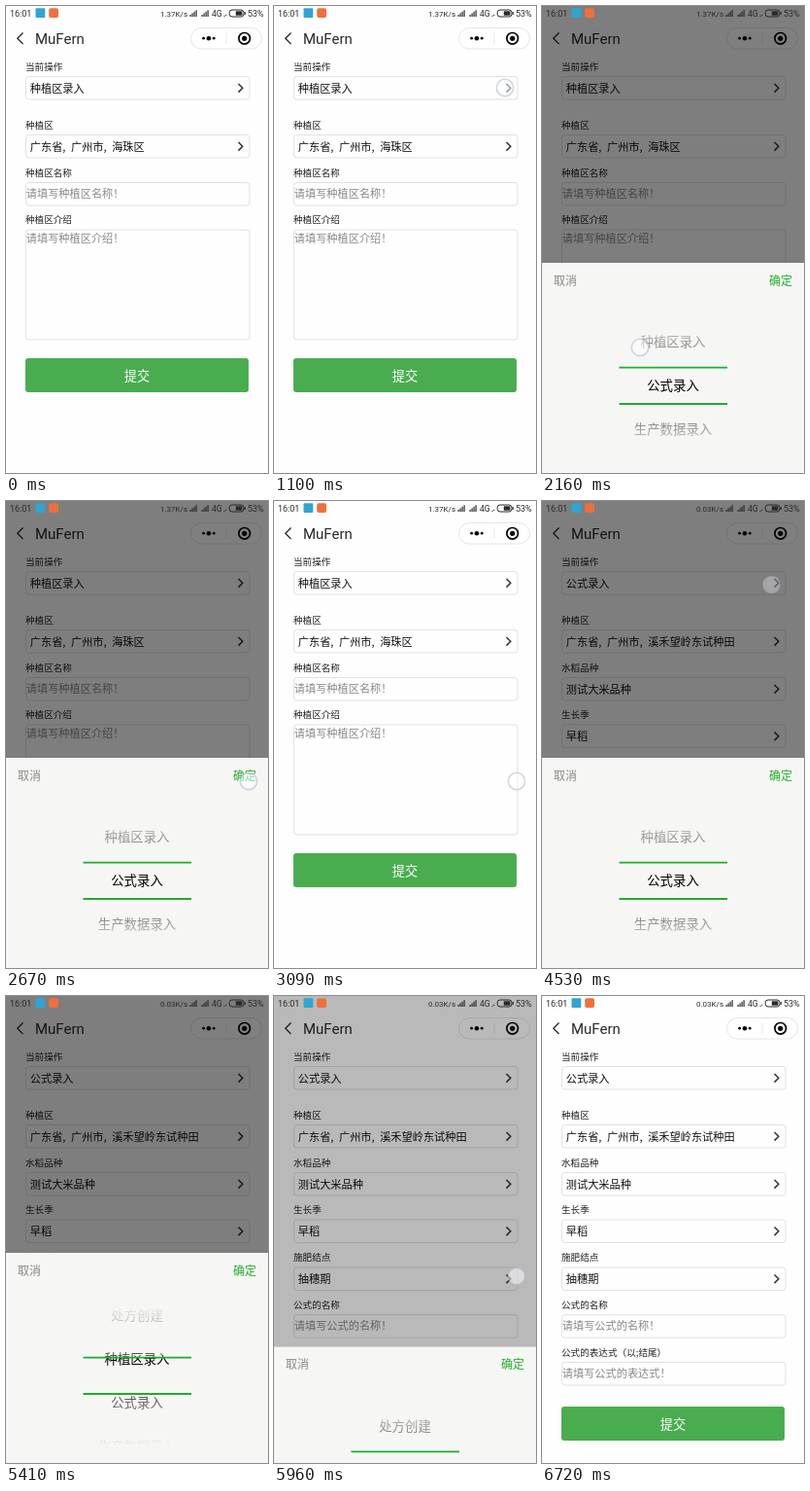
An HTML page that plays this animation: 270 by 480 pixels, repeating every 8000 ms.

```html
<!DOCTYPE html>
<html lang="zh-CN">
<head>
<meta charset="utf-8">
<style>
  html, body { margin: 0; height: 100%; overflow: hidden; background: #fefefe; }
  svg { display: block; width: 100vw; height: 100vh; }
  text { font-family: "Noto Sans CJK SC", "Noto Sans CJK", "Noto Sans SC", sans-serif; white-space: pre; }
  .latin { font-family: Roboto, "Noto Sans", sans-serif; }
  .value { word-spacing: 3px; }
</style>
</head>
<body>
<svg id="stage" viewBox="0 0 270 480"></svg>
<script>
const LOOP = 8000, GREEN = '#1fad2b', INK = '#2a2a2a', ROW = 45;
const ITEMS = ['处方创建', '种植区录入', '公式录入', '生产数据录入'];

// y is the middle of the line
const text = (x, y, size, str, attrs = '') =>
  `<text x="${x}" y="${y + size * .38}" font-size="${size}" ${attrs}>${str}</text>`;
const latin = (x, base, size, str, attrs = '') =>
  `<text class="latin" x="${x}" y="${base}" font-size="${size}" fill="${INK}" ${attrs}>${str}</text>`;
const rect = (x, y, w, h, attrs) => `<rect x="${x}" y="${y}" width="${w}" height="${h}" ${attrs}/>`;
const circle = (x, y, r, attrs = '') => `<circle cx="${x}" cy="${y}" r="${r}" ${attrs}/>`;
const line = (d, color, width) => `<path d="${d}" fill="none" stroke="${color}" stroke-width="${width}"/>`;
const ink = (x, y, w, h) => rect(x, y, w, h, `fill="${INK}"`);

const label = (y, str) => text(20, y, 9.6, str, 'fill="#222"');
const box = (y, h) => rect(20.5, y + .5, 230.5, h, 'rx="3" fill="none" stroke="#e1e1e1"');
const select = (y, name, value) => label(y, name) + box(y + 10, 23.5) +
  text(24.8, y + 22.3, 11.2, value, 'class="value" fill="#111"') +
  line(`M239.5 ${y + 18}l4.3 4.3l-4.3 4.3`, '#333', 1.5);
const input = (y, name, hint, h = 23.5) => label(y, name) + box(y + 10, h) +
  text(20.8, y + (h > 30 ? 19 : 22), 11.2, hint, 'fill="#888"');
const submit = y => rect(20, y, 230, 35, 'rx="3" fill="#49ad50"') +
  text(135, y + 17.5, 13.2, '提交', 'fill="#fff" text-anchor="middle"');

const header = line('M17.5 27.5l-5.7 5.8l5.7 5.8', '#222', 1.3) +
  latin(30, 39, 15, 'MuFern') +
  rect(190.5, 22.5, 73, 21.5, 'rx="10.75" fill="#fff" stroke="#e6e6e6"') +
  line('M227 27.5v11.5', '#e2e2e2', .8) +
  circle(203.6, 33.2, 1.4) + circle(208.9, 33.2, 2.3) + circle(214.2, 33.2, 1.4) +
  circle(245.7, 33.3, 5.8, 'fill="none" stroke="#000" stroke-width="1.7"') + circle(245.7, 33.3, 2.6);

const bars = x => [0, 1, 2, 3].map(i => ink(x + i * 2, 9 - i * 1.6, 1.2, 2 + i * 1.6)).join('');
const status = latin(4, 11, 9, '16:01') + latin(159, 10.8, 8, '', 'id="speed"') +
  bars(189.5) + bars(201.5) + latin(212, 10.8, 8.6, '4G') +
  ink(224.6, 9.8, 1, 1.2) + ink(226.3, 8.8, 1, 1.2) +
  rect(230.2, 4, 14.8, 7, `rx="2.8" fill="none" stroke="${INK}"`) +
  ink(236.8, 5.3, 6.6, 4.4) + ink(245.6, 6, 1.2, 3) + latin(249, 11, 9, '53%');
const badges = rect(30.5, 2.3, 9.8, 9.8, 'rx="1" fill="#2fa5d4"') +
  rect(44.2, 2.3, 9.8, 9.8, 'rx="2" fill="#f0703a"');

const areaForm = select(62, '当前操作', '种植区录入') +
  select(122, '种植区', '广东省, 广州市, 海珠区') +
  input(171, '种植区名称', '请填写种植区名称！') +
  input(219.5, '种植区介绍', '请填写种植区介绍！', 113) + submit(362);

const formulaForm = select(62, '当前操作', '公式录入') +
  select(122, '种植区', '广东省, 广州市, 溪禾望岭东试种田') +
  select(171, '水稻品种', '测试大米品种') + select(219.5, '生长季', '早稻') +
  select(268.5, '施肥结点', '抽穗期') +
  input(317.2, '公式的名称', '请填写公式的名称！') +
  input(366, '公式的表达式（以;结尾）', '请填写公式的表达式！') + submit(422);

// the picker is clear between its lines and fades out above and below
const stops = [[0, 0], [.37, .72], [.37, 1], [.63, 1], [.63, .72], [1, 0]];
const fade = `<linearGradient id="fade" gradientUnits="userSpaceOnUse" x1="0" x2="0" y1="318" y2="462">
  ${stops.map(([o, a]) => `<stop offset="${o}" stop-color="#fff" stop-opacity="${a}"/>`).join('')}
  </linearGradient><mask id="window" maskUnits="userSpaceOnUse" x="0" y="264" width="270" height="216">
  ${rect(0, 318, 270, 144, 'fill="url(#fade)"')}</mask>`;
const sheet = rect(0, 264, 270, 216, 'fill="#f6f6f5"') +
  text(12, 282, 12, '取消', 'fill="#888"') + text(234, 282, 12, '确定', `fill="${GREEN}"`) +
  `<g mask="url(#window)"><g id="list">${ITEMS.map((s, i) =>
    text(135, 390 + i * ROW, 13.4, s, 'text-anchor="middle"')).join('')}</g></g>` +
  line('M79.5 371.7h111.5M79.5 409h111.5', GREEN, 1.8);

const $ = id => document.getElementById(id);
$('stage').innerHTML = `${fade}<rect width="270" height="480" fill="#fefefe"/>${header}
  <g id="area">${areaForm}</g><g id="formula">${formulaForm}</g>
  <rect id="dim" width="270" height="480"/>${status}${badges}<g id="sheet">${sheet}</g>
  <circle id="touch" r="8.7" fill="#fff" fill-opacity=".5" stroke="#a9b2cc" stroke-opacity=".55" stroke-width="1.5"/>`;

const clamp = v => Math.min(1, Math.max(0, v));
const ramp = (t, a, b) => clamp((t - a) / (b - a));
const easeOut = p => 1 - (1 - p) ** 3;
const smooth = p => p * p * (3 - 2 * p);

const openness = t =>
  easeOut(ramp(t, 1160, 1500)) - easeOut(ramp(t, 2680, 3020)) +
  easeOut(ramp(t, 4360, 4530)) - easeOut(ramp(t, 5900, 6240));

// index of the centred row
const row = t => 1 + smooth(ramp(t, 1800, 2130)) - smooth(ramp(t, 5060, 5660));

// from, to, x, y, and y travel per row
const TOUCHES = [
  [980, 1240, 238, 84, 0],
  [1760, 2300, 101, 441, -ROW],
  [2600, 3230, 250, 288, 0],
  [4360, 4580, 236.5, 86, 0],
  [5030, 5320, 101, 450, -ROW],
  [5850, 6400, 250, 288, 0]
];

function draw(t) {
  const open = openness(t), r = row(t), formula = t >= 3200;
  $('area').style.display = formula ? 'none' : '';
  $('formula').style.display = formula ? '' : 'none';
  $('speed').textContent = t < 4100 ? '1.37K/s' : '0.03K/s';
  $('dim').setAttribute('opacity', .5 * open);
  $('sheet').setAttribute('transform', `translate(0 ${216 * (1 - open)})`);
  $('list').setAttribute('transform', `translate(0 ${-r * ROW})`);
  const hit = TOUCHES.find(([a, b]) => t >= a && t < b);
  $('touch').setAttribute('opacity', hit ? ramp(t, hit[0], hit[0] + 60) * ramp(t, hit[1], hit[1] - 80) : 0);
  if (hit) {
    $('touch').setAttribute('cx', hit[2]);
    $('touch').setAttribute('cy', hit[3] + hit[4] * r);
  }
}

const start = performance.now();
function frame() {
  draw((performance.now() - start) % LOOP);
  requestAnimationFrame(frame);
}
frame();
</script>
</body>
</html>
```
